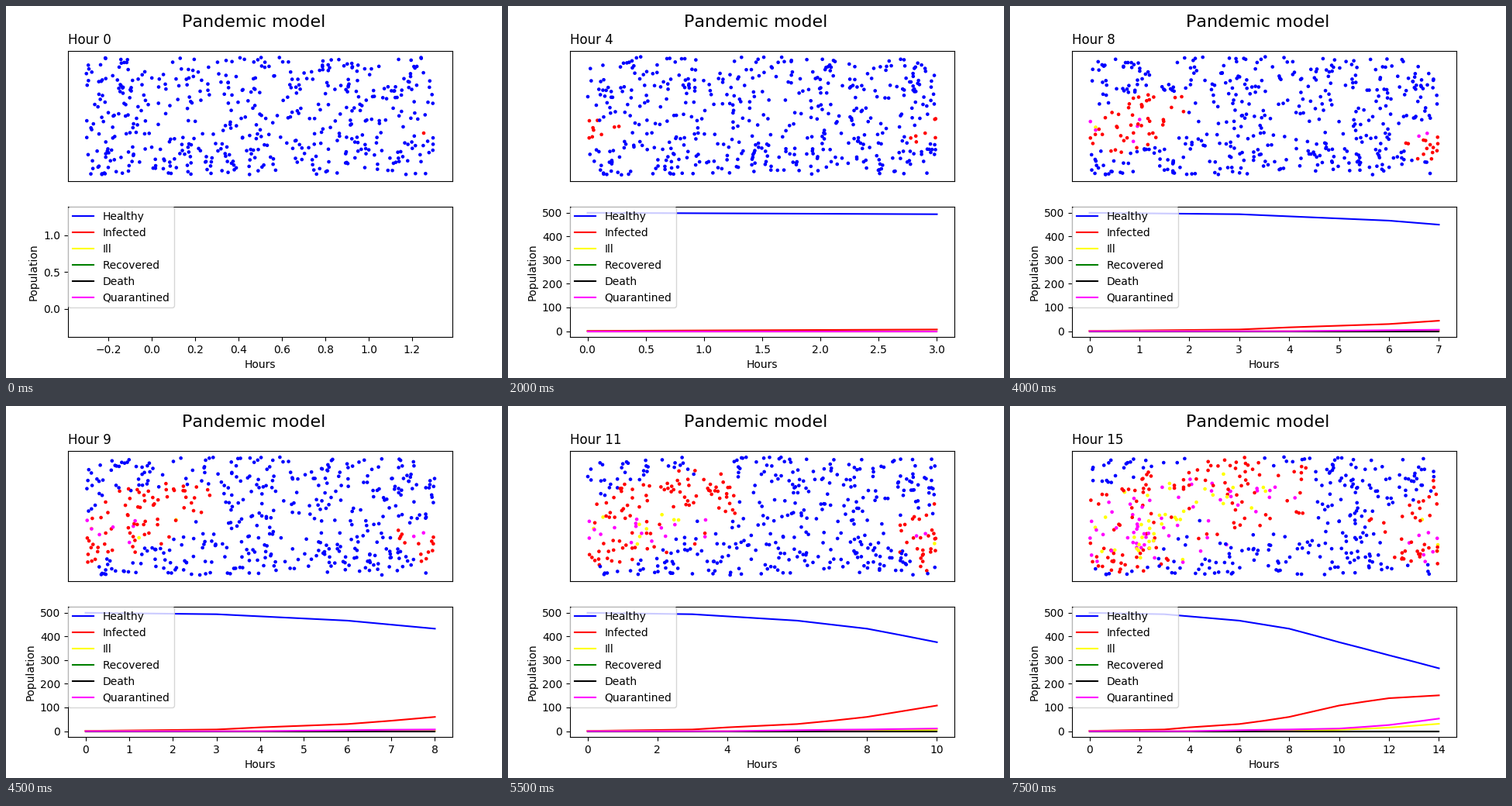
These frames come from a looping animation (640 px wide and 480 px high, 8000 ms). A matplotlib script:

```python
import matplotlib.pyplot as plt
import numpy as np
from matplotlib.animation import FuncAnimation

plt.rcParams["text.kerning_factor"] = 6

HOURS = 16
PEOPLE = 500
LEFT, TOP, WIDTH, HEIGHT = 103, 65.5, 450, 152.5
FIRST_CASE = (539, 164)
DRIFT = 20  # travellers' step per hour

# people per hour
hours = np.arange(HOURS)
affected = np.rint(np.interp(hours, [0, 3, 6, 8, 10, 15], [1, 7, 34, 68, 125, 262]))
quarantined = np.rint(np.interp(hours, [4, 10, 12, 15], [0, 11, 26, 66]))
ill = np.ceil(0.17 * np.maximum(hours - 6, 0) ** 2.5)
infected = affected - quarantined - ill
healthy = PEOPLE - affected
none = np.zeros(HOURS)

HEALTHY, INFECTED, ILL, QUARANTINED = range(4)
DOT_COLORS = np.array(["blue", "red", "yellow", "magenta"])


def growth(counts, hour):
    return int(counts[hour] - counts[hour - 1])


def exposure(people, carriers):
    """Distance to the nearest carrier, plus that to the rising path of spread."""
    gap = np.abs(people[:, None] - carriers[None])
    gap[..., 0] = np.minimum(gap[..., 0], WIDTH - gap[..., 0])
    near = np.hypot(gap[..., 0], gap[..., 1]).min(axis=1)
    ahead = (people[:, 0] - FIRST_CASE[0]) % WIDTH
    ahead[ahead > 0.7 * WIDTH] = 0
    ridge = 160 - 0.3 * np.minimum(ahead, 170)
    return near + 0.3 * np.abs(people[:, 1] - ridge)


def simulate():
    """Return the position and state of everybody for each hour."""
    rng = np.random.default_rng(12)
    pos = (LEFT, TOP) + rng.random((PEOPLE, 2)) * (WIDTH, HEIGHT)
    travels = rng.random(PEOPLE) < 0.55
    state = np.full(PEOPLE, HEALTHY)
    caught = np.zeros(PEOPLE)
    pos[0], travels[0], state[0] = FIRST_CASE, False, INFECTED
    history = [(pos.copy(), state.copy())]

    for hour in range(1, HOURS):
        moving = travels & (state <= INFECTED)
        steps = DRIFT + rng.uniform(-3, 3, PEOPLE)
        pos[moving, 0] = LEFT + (pos[moving, 0] + steps[moving] - LEFT) % WIDTH

        # the most exposed catch it
        carriers = pos[(state == INFECTED) | (state == ILL)]
        well = np.flatnonzero(state == HEALTHY)
        risk = exposure(pos[well], carriers) * rng.uniform(0.7, 1.3, len(well))
        new = well[np.argsort(risk)[:growth(affected, hour)]]
        state[new] = INFECTED
        caught[new] = hour

        # the longest infected fall ill or go into quarantine
        for kind, counts in ((QUARANTINED, quarantined), (ILL, ill)):
            pool = np.flatnonzero(state == INFECTED)
            order = np.argsort(caught[pool] + rng.uniform(0, 4, len(pool)))
            state[pool[order[:growth(counts, hour)]]] = kind

        jitter = rng.uniform(-1, 1, pos.shape)
        shown = np.clip(pos + jitter, (LEFT, TOP), (LEFT + WIDTH, TOP + HEIGHT))
        history.append((shown, state.copy()))
    return history


history = simulate()

fig, (town, chart) = plt.subplots(2, 1, figsize=(6.4, 4.8), dpi=100)
fig.suptitle("Pandemic model", fontsize=16, y=0.978)

town.set(xlim=(80, 576), ylim=(225.6, 57.6), xticks=[], yticks=[])
dots = town.scatter(*history[0][0].T, s=11, linewidths=0)
title = town.set_title("Hour 0", loc="left")

SERIES = [
    ("Healthy", "blue", healthy),
    ("Infected", "red", infected),
    ("Ill", "yellow", ill),
    ("Recovered", "green", none),
    ("Death", "black", none),
    ("Quarantined", "magenta", quarantined),
]
lines = [chart.plot([], [], color=color, label=name)[0] for name, color, _ in SERIES]
chart.set(xlabel="Hours", ylabel="Population")
chart.legend(loc="upper left", borderaxespad=0)


def update(hour):
    pos, state = history[hour]
    dots.set_offsets(pos)
    dots.set_facecolor(DOT_COLORS[state])
    title.set_text(f"Hour {hour}")
    for line, (_, _, values) in zip(lines, SERIES):
        line.set_data(hours[:hour], values[:hour])
    if hour == 0:
        chart.set(xlim=(-0.386, 1.386), ylim=(-0.386, 1.386))
    else:
        chart.relim()
        chart.autoscale(True)
        chart.autoscale_view()
    return [dots, title, *lines]


anim = FuncAnimation(fig, update, frames=HOURS, interval=500, repeat=True,
                     repeat_delay=0, blit=False)
plt.show()
```
